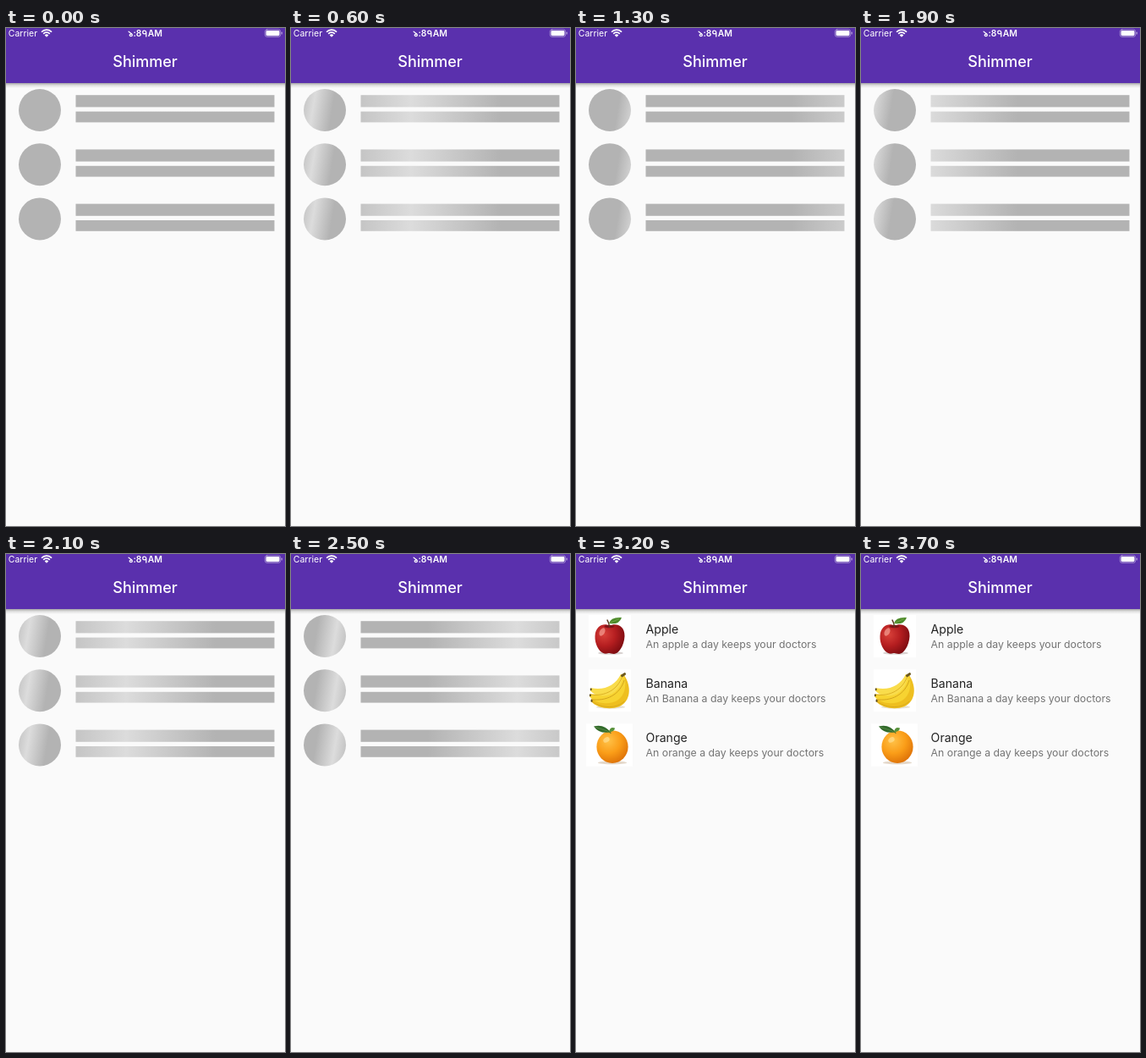
These frames come from a looping animation (330 by 588 pixels, 4400 ms). An HTML page with a canvas:

```html
<!DOCTYPE html>
<html lang="en">
<head>
<meta charset="utf-8">
<title>Shimmer</title>
<style>
  html, body { margin: 0; width: 100%; height: 100%; overflow: hidden; background: #fafafa; }
  canvas { display: block; width: 330px; height: 588px; }
</style>
</head>
<body>
<canvas id="stage"></canvas>
<script>
const W = 330, H = 588, LOOP = 4400, LOADED = 2700;
const PERIOD = 1500, START = 35;
const BASE = '#b3b3b3', LIGHT = '#dcdcdc';
const STEPS = [0, 200, 300, 400, 600, 800, 1000, 1100, 1300, 1500, 1700, 1900, 2100, 2300, 2400, 2500, 2700];
const ROWS = [
  { y: 72, name: 'Apple', note: 'An apple a day keeps your doctors', art: drawApple },
  { y: 136.2, name: 'Banana', note: 'An Banana a day keeps your doctors', art: drawBanana },
  { y: 200.4, name: 'Orange', note: 'An orange a day keeps your doctors', art: drawOrange }
];

const canvas = document.getElementById('stage');
const ctx = canvas.getContext('2d');
const ratio = window.devicePixelRatio || 1;
canvas.width = W * ratio;
canvas.height = H * ratio;
ctx.scale(ratio, ratio);

function text(str, x, y, size, color, weight = 400, align = 'left') {
  ctx.font = `${weight} ${size}px Inter, Roboto, sans-serif`;
  ctx.textAlign = align;
  ctx.fillStyle = color;
  ctx.fillText(str, x, y);
}

function rect(x, y, w, h, fill) {
  ctx.fillStyle = fill;
  ctx.fillRect(x, y, w, h);
}

function ellipse(x, y, rx, ry, fill, turn = 0) {
  ctx.beginPath();
  ctx.ellipse(x, y, rx, ry, turn, 0, Math.PI * 2);
  ctx.fillStyle = fill;
  ctx.fill();
}

function shape(d, fill) {
  ctx.fillStyle = fill;
  ctx.fill(new Path2D(d));
}

function line(d, color, width) {
  ctx.strokeStyle = color;
  ctx.lineWidth = width;
  ctx.lineCap = ctx.lineJoin = 'round';
  ctx.stroke(new Path2D(d));
}

function radial(x, y, r, ...colors) {
  const g = ctx.createRadialGradient(x, y, 0, x, y, r);
  colors.forEach((c, i) => g.addColorStop(i / (colors.length - 1), c));
  return g;
}

// A band sweeps across a box, slightly tilted, from before its left edge to past its right.
function shimmer(x, y, w, h, t) {
  const phase = ((t - START) / PERIOD % 1 + 1) % 1;
  const left = x + (2 * phase - 2) * w;
  const g = ctx.createLinearGradient(left, y, left + 3 * w, y + h / 2);
  g.addColorStop(0.35, BASE);
  g.addColorStop(0.5, LIGHT);
  g.addColorStop(0.65, BASE);
  return g;
}

function drawSkeleton(t) {
  for (const { y } of ROWS) {
    ellipse(40, y + 25, 25, 25, shimmer(15, y, 50, 50, t));
    for (const [dy, h] of [[7.2, 14.2], [26.6, 12.8]]) {
      rect(82.5, y + dy, 235, h, shimmer(82.5, y + dy, 235, h, t));
    }
  }
}

function drawApple() {
  rect(15, 0, 50, 50, '#fff');
  ellipse(41, 45, 15, 1.8, '#d8d2d0');
  shape('M40 13 C45 9 58 11 57.5 25 C57 37 50 46 45 46 C42 46 41 45 39.5 45 C38 45 36 46 33.5 45.5 C27 44 22 34 22.5 25 C23 12 34 9 40 13Z',
    radial(33, 23, 27, '#d9413a', '#b51e20', '#790b10'));
  ellipse(31, 20, 3, 5, 'rgba(255,190,175,.55)', 0.5);
  ellipse(39.5, 13.5, 6, 1.8, '#80151a');
  line('M39.5 14 Q39 9 37 6', '#5b3a24', 1.4);
  shape('M39 10 Q41 2 54 3 Q51 12 39 10Z', '#4d8a2b');
  line('M40 9.5 L51 4.5', '#7fae4f', 0.7);
}

function drawBanana() {
  rect(15, 0, 50, 50, '#fff');
  ellipse(41, 44.5, 17, 2, '#e6e1d5');
  shape('M53 6 L57 7 C66 20 65 38 51 44 C41 48 25 46 18 38 L18 35 C31 37 46 28 53 6Z', '#eebf20');
  shape('M53 6 L57 7 C61 22 56 36 43 39 C32 42 21 38 16 32 L17 29 C33 31 46 24 53 6Z', '#f7d331');
  shape('M53 6 L55 7 C55 20 46 30 35 31 C27 32 20 29 17 25 L18 22 C34 25 46 19 53 6Z', '#f9dc4b');
  line('M18 35.5 C36 38 52 30 57 13', '#c99918', 0.8);
  line('M18 30 C35 32 49 24 54.5 9', '#d6a81d', 0.8);
  line('M19 38 C32 47 48 46 57 38', '#d2a21c', 0.8);
  line('M54.5 7.5 L57.5 5.5', '#6e5a20', 3);
  for (const [x, y] of [[17.7, 23.5], [16.8, 30.5], [18.5, 37]]) ellipse(x, y, 1, 1.5, '#5c4a1d');
}

function drawOrange() {
  rect(12, 0, 55, 50.5, '#fff');
  ellipse(43, 46, 17, 2, '#e4d8ca');
  ellipse(43, 27.3, 18.6, 19.3, radial(38, 20, 30, '#ffc248', '#fa9d18', '#d96b05'));
  ellipse(36, 19, 4, 2.8, 'rgba(255,231,165,.55)', -0.6);
  line('M41 11 Q39 8 35 6', '#567231', 1.2);
  shape('M40 10 Q27 12 21 3 Q34 0 40 10Z', '#326b2b');
  shape('M39 10 Q40 3 46 5 Q46 9 39 10Z', '#58913a');
  line('M23 4 L38 9', '#719b58', 0.6);
}

function drawList() {
  for (const row of ROWS) {
    ctx.save();
    ctx.translate(0, row.y);
    row.art();
    ctx.restore();
    text(row.name, 82.6, row.y + 21.7, 14.1, '#222');
    text(row.note, 82.6, row.y + 38.8, 12.3, '#747474');
  }
}

function drawWifi() {
  ctx.strokeStyle = '#fff';
  ctx.lineCap = 'butt';
  ctx.lineWidth = 1.7;
  for (const r of [8.2, 5.2]) {
    ctx.beginPath();
    ctx.arc(48, 10.4, r, -Math.PI * 0.76, -Math.PI * 0.24);
    ctx.stroke();
  }
  shape('M48 10.7 L45.7 8.4 Q48 6.3 50.3 8.4Z', '#fff');
}

function drawBattery() {
  ctx.beginPath();
  ctx.roundRect(306.3, 1.8, 18.4, 8.6, 2.5);
  ctx.strokeStyle = 'rgba(255,255,255,.45)';
  ctx.lineWidth = 0.9;
  ctx.stroke();
  ctx.beginPath();
  ctx.roundRect(307.5, 3, 16, 6.2, 1.4);
  ctx.fillStyle = '#fff';
  ctx.fill();
  ctx.beginPath();
  ctx.roundRect(325.6, 4.6, 1.2, 3, 0.6);
  ctx.fillStyle = 'rgba(255,255,255,.55)';
  ctx.fill();
}

// The first and last digits of the clock are Bengali numerals, drawn as strokes.
function drawClock() {
  line('M145 4.2 C147 6.2 149.4 6.4 149.4 8.2 C149.4 10 146.2 10.1 146.2 8.4 C146.2 7.4 147.3 7.2 147.8 7.7', '#fff', 1.2);
  text(':', 150.6, 10, 10.5, '#fff', 600);
  text('8', 153.7, 10, 10.3, '#fff', 600);
  line('M165.8 10 L165.8 5 C165.6 2.4 161.7 2.4 161.7 4.9 C161.7 7.2 164.5 7.3 165.6 5.9', '#fff', 1.3);
  text('AM', 185, 10, 10.5, '#fff', 600, 'right');
}

function drawHeader() {
  const shade = ctx.createLinearGradient(0, 65, 0, 71);
  shade.addColorStop(0, 'rgba(0,0,0,.34)');
  shade.addColorStop(0.45, 'rgba(0,0,0,.11)');
  shade.addColorStop(1, 'rgba(0,0,0,0)');
  rect(0, 65, W, 6, shade);
  rect(0, 0, W, 65, '#5a30ad');
  text('Carrier', 2.8, 10, 10.5, '#fff');
  drawWifi();
  drawClock();
  drawBattery();
  text('Shimmer', 164.5, 46, 18, '#fff', 500, 'center');
}

function draw(now) {
  const time = now % LOOP;
  const t = STEPS.filter(s => s <= time).pop() || 0;
  rect(0, 0, W, H, '#fafafa');
  if (t < LOADED) drawSkeleton(t);
  else drawList();
  drawHeader();
}

const begin = performance.now();
function tick() {
  draw(performance.now() - begin);
  requestAnimationFrame(tick);
}
tick();
</script>
</body>
</html>
```
